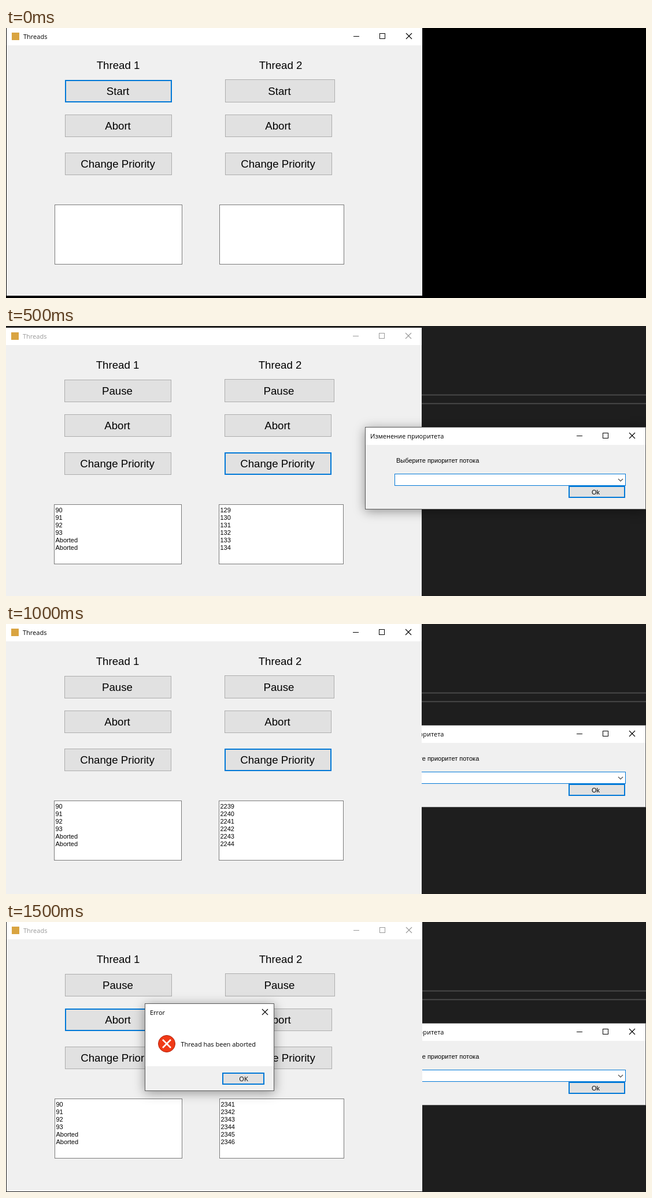
These frames come from a looping animation (1107 by 468 pixels, 2 s). An HTML page with a canvas:

```html
<!DOCTYPE html>
<html lang="en">
<head>
<meta charset="utf-8">
<title>Threads</title>
<style>
html, body { margin: 0; width: 100%; height: 100%; overflow: hidden; background: #000; }
canvas { display: block; width: 1107px; height: 468px; }
</style>
</head>
<body>
<canvas id="stage" width="1107" height="468"></canvas>
<script>
const ctx = document.getElementById('stage').getContext('2d');
const UI = '11px "Open Sans", "Noto Sans", sans-serif';
const SMALL = '11px "Liberation Sans", Arial, sans-serif';
const LARGE = '18.67px "Liberation Sans", Arial, sans-serif';
const BLUE = '#0078d7', FACE = '#f0f0f0', DARK = '#1e1e1e';

function rect(x, y, w, h, color) {
  ctx.fillStyle = color;
  ctx.fillRect(x, y, w, h);
}

function box(x, y, w, h, fill, border, line = 1) {
  rect(x, y, w, h, border);
  rect(x + line, y + line, w - 2 * line, h - 2 * line, fill);
}

function text(str, x, y, font, color = '#000', align = 'left') {
  ctx.font = font;
  ctx.fillStyle = color;
  ctx.textAlign = align;
  ctx.fillText(str, x, y);
}

function stroke(points, color, width = 1) {
  ctx.strokeStyle = color;
  ctx.lineWidth = width;
  ctx.beginPath();
  points.forEach(([x, y], i) => i ? ctx.lineTo(x, y) : ctx.moveTo(x, y));
  ctx.stroke();
}

function cross(x, y, r, color, width = 1) {
  stroke([[x - r, y - r], [x + r, y + r]], color, width);
  stroke([[x + r, y - r], [x - r, y + r]], color, width);
}

// Minimise, maximise and close, placed from the centre of the close mark
function controls(x, y, color) {
  rect(x - 96, y, 10, 1, color);
  ctx.strokeStyle = color;
  ctx.lineWidth = 1;
  ctx.strokeRect(x - 50.5, y - 4.5, 9, 9);
  cross(x, y, 5, color, 1.1);
}

function button(label, x, y, w, h, focus) {
  box(x, y, w, h, '#e1e1e1', focus ? BLUE : '#adadad', focus ? 2 : 1);
  text(label, x + w / 2 - 1, y + h - 13, LARGE, '#000', 'center');
}

function list(items, x) {
  box(x, 306, 221 - (x > 200 ? 5 : 0), 104, '#fff', '#7a7a7a');
  items.forEach((s, i) => text(s, x + 2.5, 320 + 13 * i, SMALL));
}

function mainWindow(s) {
  const tone = s.active ? '#000' : '#999';
  ctx.save();
  ctx.translate(s.x, s.y);
  rect(0, 0, 719, s.height, FACE);
  rect(0, 0, 719, 30, '#fff');
  rect(9, 8, 13, 13, '#d9a441');
  text('Threads', 29, 19, UI, tone);
  controls(696, 14, tone);

  text('Thread 1', 193, 71, LARGE, '#000', 'center');
  text('Thread 2', 474, 71, LARGE, '#000', 'center');
  button(s.label, 101, 90, 185, 39, s.focus === 'start');
  button(s.label, 378, 89, 190, 40, false);
  button('Abort', 101, 150, 185, 39, s.focus === 'abort');
  button('Abort', 378, 150, 185, 39, false);
  button('Change Priority', 101, 216, 185, 39, false);
  button('Change Priority', 378, 216, 185, 39, s.focus === 'priority');

  list(s.count ? [90, 91, 92, 93, 'Aborted', 'Aborted'] : [], 83);
  list(s.count ? Array.from({ length: 6 }, (_, i) => s.count + i) : [], 368);
  ctx.restore();
}

function frame(x, y, w, h, shadow) {
  ctx.save();
  if (shadow) {
    ctx.shadowColor = 'rgba(0,0,0,0.4)';
    ctx.shadowBlur = 18;
    ctx.shadowOffsetY = 3;
  }
  rect(x, y, w, h, '#5a5a5a');
  ctx.restore();
}

function priorityDialog(shadow) {
  frame(621, 175, 486, 143, shadow);
  rect(622, 176, 484, 141, FACE);
  rect(622, 176, 484, 30, '#fff');
  text('Изменение приоритета', 630, 195, UI);
  controls(1083, 190, '#000');
  text('Выберите приоритет потока', 675, 237, SMALL);
  box(672, 256, 400, 21, '#fff', BLUE);
  stroke([[1059, 265], [1063, 269], [1067, 265]], '#444', 1.1);
  box(973, 277, 98, 21, '#e1e1e1', BLUE, 2);
  text('Ok', 1020, 292, SMALL, '#000', 'center');
}

function errorDialog() {
  frame(240, 141, 224, 152, true);
  rect(241, 142, 222, 108, '#fff');
  rect(241, 250, 222, 42, FACE);
  text('Error', 249, 161, UI);
  cross(448, 156, 5, '#000', 1.1);
  ctx.beginPath();
  ctx.arc(278, 211, 14.5, 0, 2 * Math.PI);
  ctx.fillStyle = '#f03a17';
  ctx.fill();
  ctx.strokeStyle = '#b3200c';
  ctx.lineWidth = 1;
  ctx.stroke();
  cross(278, 211, 7, '#fff', 2.6);
  text('Thread has been aborted', 302.5, 216, UI);
  box(374, 261, 73, 21, '#e1e1e1', BLUE, 2);
  text('OK', 411, 276, UI, '#000', 'center');
}

function backdrop() {
  rect(0, 0, 1107, 468, DARK);
  rect(719, 118, 388, 3, '#303030');
  rect(719, 119, 388, 1, '#4c4c4c');
  rect(719, 133, 388, 3, '#303030');
  rect(719, 134, 388, 1, '#4c4c4c');
}

const scenes = [
  { x: 1, y: 0, height: 464, active: true, label: 'Start', focus: 'start', count: 0 },
  { x: 0, y: 3, height: 465, active: false, label: 'Pause', focus: 'priority', count: 129, dialog: 'front' },
  { x: 0, y: 0, height: 468, active: true, label: 'Pause', focus: 'priority', count: 2239, dialog: 'back' },
  { x: 1, y: 0, height: 467, active: false, label: 'Pause', focus: 'abort', count: 2341, dialog: 'back', error: true }
];

function draw(s) {
  if (s.dialog) backdrop();
  else rect(0, 0, 1107, 468, '#000');
  if (s.dialog === 'back') priorityDialog(false);
  mainWindow(s);
  if (s.dialog === 'front') priorityDialog(true);
  if (s.error) errorDialog();
}

const start = performance.now();
function tick() {
  const t = (performance.now() - start) % 2000;
  draw(scenes[Math.floor(t / 500)]);
  requestAnimationFrame(tick);
}
tick();
</script>
</body>
</html>
```
